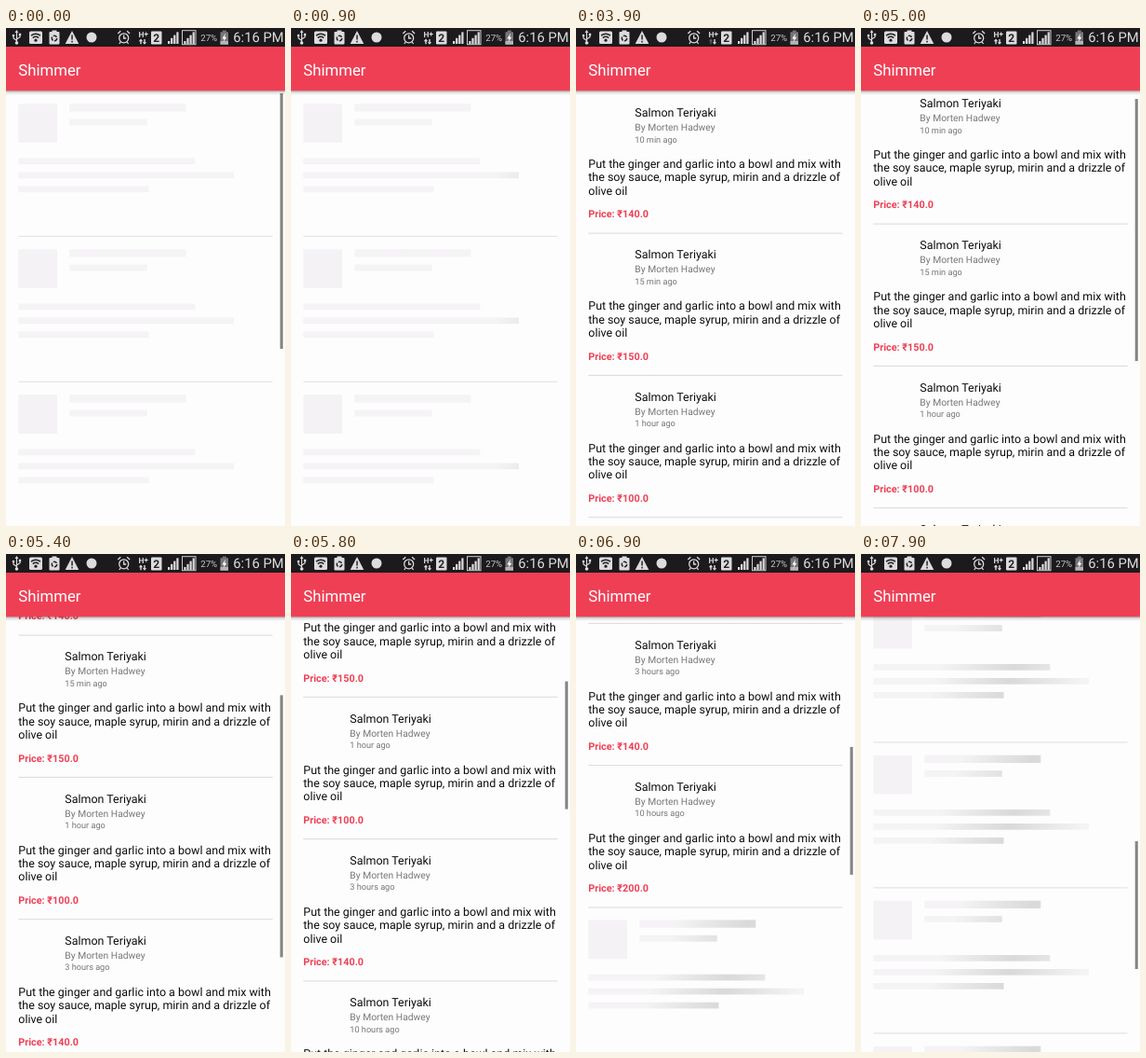
An HTML page that plays this animation: 300 by 534 pixels, repeating every 8 s.

```html
<!DOCTYPE html>
<html lang="en">
<head>
<meta charset="utf-8">
<title>Shimmer list</title>
<style>
  html, body { margin: 0; width: 100%; height: 100%; overflow: hidden; background: #fdfdfd; }
  svg { display: block; width: 300px; height: 534px; font-family: Roboto, "Noto Sans", sans-serif; }
  text { text-rendering: geometricPrecision; }
  .name, .body { font-size: 12.46px; fill: #0c0c0c; }
  .by { font-size: 10.3px; fill: #777; }
  .ago { font-size: 9.17px; fill: #757575; }
  .price { font-size: 10.83px; font-weight: 700; fill: #ee3f55; }
</style>
</head>
<body>
<svg viewBox="0 0 300 534" xmlns="http://www.w3.org/2000/svg">
  <defs>
    <linearGradient id="glow" gradientUnits="userSpaceOnUse" x1="-75" y1="0" x2="75" y2="0">
      <stop offset="0" stop-color="#f5f3f5"/>
      <stop offset=".5" stop-color="#d9d9d9"/>
      <stop offset="1" stop-color="#f5f3f5"/>
    </linearGradient>
    <linearGradient id="shade" x1="0" y1="0" x2="0" y2="1">
      <stop offset="0" stop-color="#000" stop-opacity=".32"/>
      <stop offset=".5" stop-color="#000" stop-opacity=".1"/>
      <stop offset="1" stop-color="#000" stop-opacity="0"/>
    </linearGradient>
  </defs>

  <rect width="300" height="534" fill="#fdfdfd"/>
  <g id="first"></g>
  <g id="list"></g>
  <rect id="thumb" x="294.7" width="3.1" fill="#868686"/>

  <rect y="67" width="300" height="5" fill="url(#shade)"/>
  <rect y="20" width="300" height="47.3" fill="#ef3f55"/>
  <text x="13.2" y="50.6" font-size="16.8" fill="#fff">Shimmer</text>

  <rect width="300" height="20" fill="#1c1a1c"/>
  <g fill="#dcdcdc">
    <!-- usb -->
    <g fill="none" stroke="#dcdcdc" stroke-width="1.2">
      <path d="M11.5 4V16M11.5 13.5L8 11V8.5M11.5 12L15 9.7V7.5"/>
    </g>
    <path d="M11.5 2L13.4 5H9.6ZM13.8 5.8h2.4v2.4h-2.4Z"/>
    <circle cx="8" cy="8" r="1.3"/><circle cx="11.5" cy="16" r="1.8"/>
    <!-- wifi -->
    <rect x="25" y="3.5" width="14" height="13.5" rx="1.5"/>
    <g fill="none" stroke="#222" stroke-width="1.5">
      <path d="M27 8.2Q32 4.3 37 8.2M28.8 10.6Q32 8 35.2 10.6"/>
    </g>
    <circle cx="32" cy="13.2" r="1.6" fill="#222"/>
    <!-- battery saver -->
    <rect x="46.5" y="4" width="11" height="13.5" rx="1"/><rect x="49.5" y="2.5" width="5" height="2"/>
    <circle cx="52" cy="11" r="2.7" fill="none" stroke="#222" stroke-width="1.5" stroke-dasharray="4.2 1.4"/>
    <!-- warning -->
    <path d="M71 3L78.3 17H63.7Z"/>
    <path d="M70.3 7.5h1.5v5h-1.5ZM70.3 13.8h1.5v1.6h-1.5Z" fill="#222"/>
    <circle cx="92" cy="10" r="5.5"/>
    <!-- alarm -->
    <g fill="none" stroke="#dcdcdc" stroke-width="1.3">
      <circle cx="126.7" cy="10.8" r="5"/>
      <path d="M126.7 7.6V11H129.3M120.3 6L123.3 3.2M133.1 6L130.1 3.2M123.2 15L121.8 17M130.2 15L131.6 17"/>
    </g>
    <!-- mobile data -->
    <text x="142.6" y="9.6" font-size="8.4" font-weight="700">H</text>
    <path id="plus" d="M148.6 5.9h1.5V4.4h1.2v1.5h1.5v1.2h-1.5v1.5h-1.2V7.1h-1.5Z"/>
    <path id="up" d="M145 11.6L147.2 14.2H145.7V17.3H144.3V14.2H142.8Z"/>
    <path id="down" d="M149 17.8L146.8 15.2H148.3V12H149.7V15.2H151.2Z"/>
    <rect x="156" y="3.5" width="11.5" height="14" rx="1"/>
    <text x="158.2" y="14.7" font-size="12" font-weight="700" style="fill:#222">2</text>
    <g id="signal"></g>
    <rect x="189.5" y="2.7" width="14.5" height="15" fill="none" stroke="#cfcfcf"/>
    <text x="209.2" y="13.8" font-size="9.7" fill="#c4c4c4">27%</text>
    <!-- battery -->
    <g fill="#777"><rect x="230.5" y="4.3" width="8.5" height="13.4"/><rect x="232.8" y="2.6" width="4" height="2"/></g>
    <rect x="230.5" y="14" width="8.5" height="3.7" fill="#b4b4b4"/>
    <path d="M236 5.8L232.4 11.4H234.6L233.7 15L237.3 9.8H235.1Z" fill="#fff"/>
    <text x="244.3" y="15.2" font-size="14.8">6:16 PM</text>
  </g>
</svg>

<script>
const LOOP = 8000, STEP = 100;
const TOP = 68, CARD = 152.3, BONE = 156;
const $ = id => document.getElementById(id);

const dishes = [
  ["10 min ago", 140], ["15 min ago", 150], ["1 hour ago", 100],
  ["3 hours ago", 140], ["10 hours ago", 200]
];
const recipe = [
  "Put the ginger and garlic into a bowl and mix with",
  "the soy sauce, maple syrup, mirin and a drizzle of",
  "olive oil"
];

// [time, scroll offset]
const scroll = [
  [0, 0], [4900, 0], [5000, 10], [5200, 88], [5300, 119], [5400, 133], [5500, 133],
  [5600, 152], [6200, 353.2], [6400, 415], [6700, 435], [6800, 435], [6900, 450.3],
  [7000, 450.3], [7100, 480], [7500, 672], [7700, 742], [7900, 783], [8000, 783]
];
const fade = [[0, 1], [350, 1], [650, 0], [4900, 0], [5000, 1], [8000, 1]];
const sweeps = [150, 1850, 5800, 6385, 7385];

const text = (cls, x, y, s) => `<text class="${cls}" x="${x}" y="${y}">${s}</text>`;
const rect = (x, y, w, h, fill) =>
  `<rect x="${x}" y="${y}" width="${w}" height="${h}" fill="${fill}"/>`;
const at = (y, inner) => `<g transform="translate(0 ${y})">${inner}</g>`;

function card([ago, price]) {
  return text("name", 63.3, 27, "Salmon Teriyaki") +
    text("by", 63.3, 42.1, "By Morten Hadwey") +
    text("ago", 63.3, 54.5, ago) +
    recipe.map((line, i) => text("body", 13.3, 82 + i * 14.4, line)).join("") +
    text("price", 13.3, 135.4, `Price: ₹${price}.0`) +
    rect(13.3, 151.6, 273.3, 1, "#dadada");
}

function bone() {
  const bars = [
    [68.3, 13.2, 125, 8.3], [68.3, 29.6, 83.4, 6.8],
    [13.3, 71.5, 190, 6.7], [13.3, 86.5, 231.7, 6.7], [13.3, 101.5, 140.2, 6.7]
  ];
  return rect(13.3, 13.3, 41.7, 41.7, "#f4f2f5") +
    bars.map(b => rect(...b, "url(#glow)")).join("") +
    rect(13.3, 154.8, 273.3, 1.2, "#e4e4e4");
}

const bones = n => Array.from({ length: n }, (_, i) => at(i * BONE, bone())).join("");

$("first").innerHTML = at(TOP, bones(3));
$("list").innerHTML = dishes.map((d, i) => at(i * CARD, card(d))).join("") +
  `<g id="more">${at(5 * CARD, bones(5))}</g>`;
$("signal").innerHTML = [174, 191.3].map(x => [0, 1, 2, 3].map(i =>
  rect(x + i * 3.1, 14 - i * 3.2, 2.2, 3 + i * 3.2, "#dcdcdc")).join("")).join("");

function track(points, t) {
  const i = Math.max(1, points.findIndex(p => p[0] >= t));
  const [t0, a] = points[i - 1], [t1, b] = points[i];
  return a + (b - a) * (t - t0) / (t1 - t0);
}

function glowX(t) {
  const shown = t < 2700 ? Math.min(t, 2400) : t;
  const start = sweeps.filter(s => s <= shown).pop();
  return start === undefined ? -400 : -150 + 0.6 * (shown - start);
}

const show = (id, on) => $(id).setAttribute("display", on ? "inline" : "none");
const lit = (id, on) => $(id).setAttribute("fill", on ? "#dcdcdc" : "#5c5c5c");

function draw(t) {
  const loaded = t >= 2700, more = t >= 5700;
  const y = track(scroll, t);
  show("first", !loaded);
  show("list", loaded);
  show("more", more);
  $("list").setAttribute("transform", `translate(0 ${TOP - y})`);
  $("glow").setAttribute("gradientTransform", `translate(${glowX(t)} 90) rotate(20)`);

  $("thumb").setAttribute("y", 70 + y * (more ? 0.304 : 0.612));
  $("thumb").setAttribute("height", more ? 137 : loaded ? 281 : 274);
  $("thumb").setAttribute("opacity", track(fade, t));

  show("plus", t < 2100 || t >= 3900);
  lit("down", t < 2100 || t >= 3400);
  lit("up", t < 2100 || t >= 4300);
}

const begin = performance.now();
function tick() {
  const t = (performance.now() - begin) % LOOP;
  draw(Math.floor(t / STEP) * STEP);
  requestAnimationFrame(tick);
}
tick();
</script>
</body>
</html>
```
